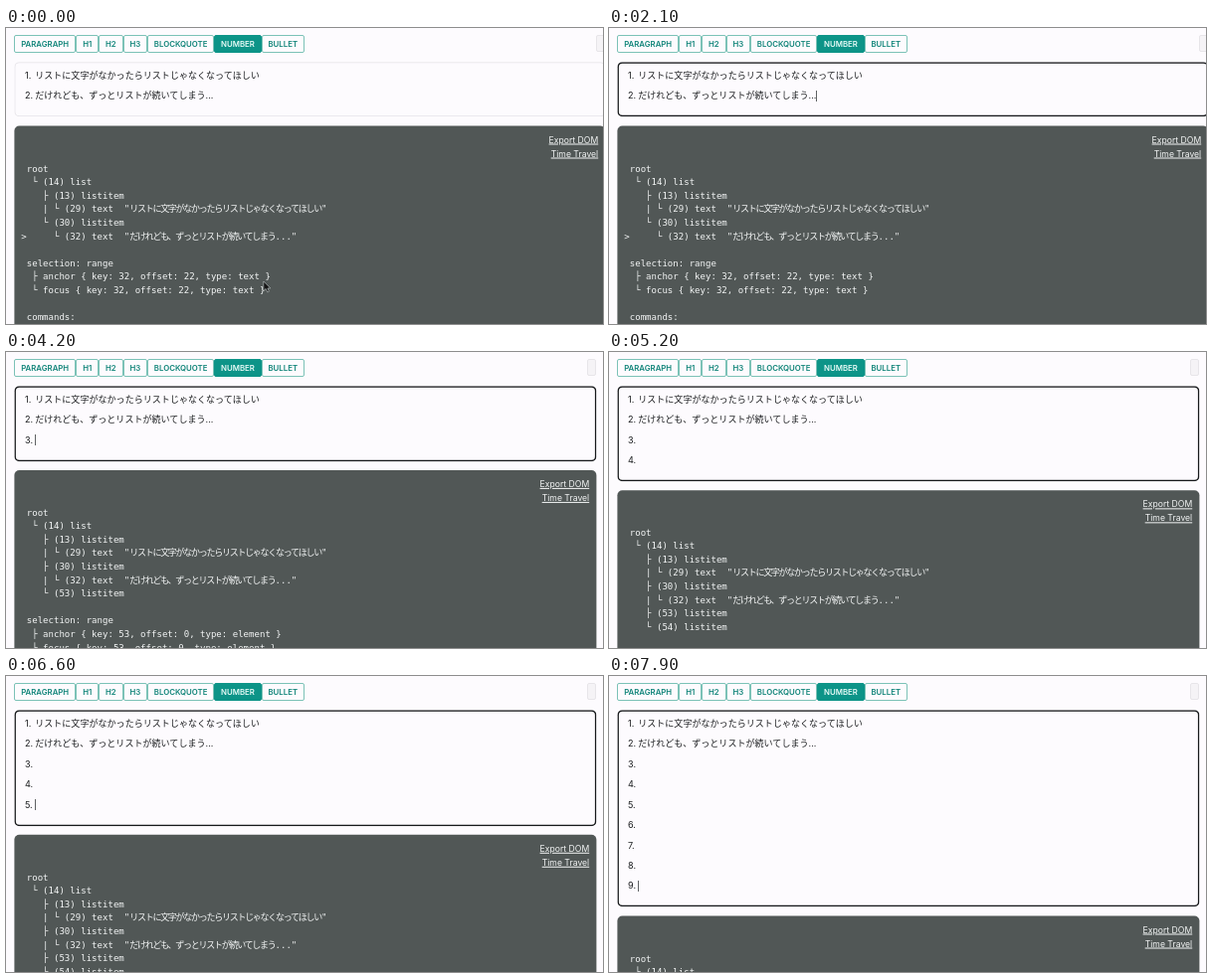
Animation of 600 by 298 pixels, one loop 8 s. Source, as an HTML page:

```html
<!DOCTYPE html>
<html lang="ja">
<head>
<meta charset="utf-8">
<title>List editor</title>
<style>
  html, body { margin: 0; width: 100%; height: 100%; overflow: hidden; background: #fdfbfe; }
  #stage { position: relative; width: 600px; height: 298px; overflow: hidden; }
  #stage * { box-sizing: border-box; }
  #stage > *, .row, .row span, .link { position: absolute; }
  #stage, .link { font-family: Inter, "Noto Sans CJK JP", sans-serif; }
  .button {
    top: 7px; height: 18px; border: 1px solid #7cc2b7; border-radius: 2px;
    color: #12857a; font-size: 7.8px; font-weight: 600; line-height: 16.5px; text-align: center;
  }
  .button.on { background: #0d9488; border-color: #0d9488; color: #e8fbf7; }
  #side { top: 7px; height: 17px; width: 9px; border: 1px solid #e7e5e9; border-radius: 2px; background: #f5f3f6; }
  #editor { left: 0; top: 0; transform: translate(8.4px, 34.2px); border-radius: 5px; box-shadow: inset 0 0 0 1px #e6e4e9; }
  #editor.focus { box-shadow: inset 0 0 0 1.5px #17191b; }
  .row { left: 0; height: 20.4px; line-height: 20.4px; font-size: 9.05px; color: #1d1f21; white-space: pre; }
  .row .num { left: 19px; }
  .row .text { left: 29.2px; }
  #caret { width: 1px; height: 11px; background: #606264; }
  #panel { left: 0; top: 0; height: 320px; border-radius: 5px; background: #515756; }
  .link { right: 6.8px; font-size: 8.65px; line-height: 13.6px; color: #f1f3f3; text-decoration: underline; white-space: pre; }
  #tree {
    left: 6.9px; top: 36.7px; margin: 0; position: absolute; color: #f4f6f6;
    font: 9.05px/13.6px "DejaVu Sans Mono", monospace;
  }
  #tree span { font-family: "Noto Sans CJK JP", sans-serif; font-weight: 500; letter-spacing: -1.32px; line-height: 0; }
  #mouse { left: 0; top: 0; width: 10px; height: 14px; overflow: visible; }
</style>
</head>
<body>
<div id="stage">
  <div id="side"></div>
  <div id="editor"></div>
  <div id="list"></div>
  <div id="caret"></div>
  <div id="panel">
    <div class="link" style="top:8.2px">Export DOM</div>
    <div class="link" style="top:21.8px">Time Travel</div>
    <pre id="tree"></pre>
  </div>
  <svg id="mouse"><path d="M0 0V9.5L2.3 7.5 4 11 5.6 10.2 4.1 7H7Z" fill="#151515" stroke="#b4baba" stroke-width=".7"/></svg>
</div>
<script>
  const LOOP = 8000, FOCUS = 900, BLINK = 1060, PITCH = 20.43;
  const ENTERS = [2700, 4400, 6300, 6800, 7200, 7500, 7800];
  const FIRST = "リストに文字がなかったらリストじゃなくなってほしい";
  const SECOND = "だけれども、ずっとリストが続いてしまう";
  const BUTTONS = [
    ["PARAGRAPH", 8, 62.4], ["H1", 70, 23.4], ["H2", 93, 24.6], ["H3", 117.5, 24.6],
    ["BLOCKQUOTE", 142, 67.3], ["NUMBER", 209, 48], ["BULLET", 256.5, 43.5]
  ];
  const $ = id => document.getElementById(id);
  const px = (el, props) => { for (const k in props) el.style[k] = props[k] + "px"; };

  function add(parent, tag, cls, text) {
    const el = parent.appendChild(document.createElement(tag));
    el.className = cls;
    el.textContent = text;
    return el;
  }

  for (const [label, left, width] of BUTTONS) {
    const cls = label === "NUMBER" ? "button on" : "button";
    px(add($("stage"), "div", cls, label), { left, width });
  }

  const rows = Array.from({ length: 9 }, (_, i) => {
    const row = add($("list"), "div", "row", "");
    px(row, { top: 38 + PITCH * i });
    add(row, "span", "num", i + 1 + ".");
    add(row, "span", "text", [FIRST, SECOND + "..."][i] || "");
    return row;
  });

  function treeText(n) {
    const two = n === 2;
    const lines = [
      " root", "  └ (14) list", "    ├ (13) listitem",
      `    | └ (29) text  "<span>${FIRST}</span>"`,
      `    ${two ? "└" : "├"} (30) listitem`,
      `${two ? ">     " : "    | "}└ (32) text  "<span>${SECOND}</span>..."`
    ];
    for (let i = 3; i <= n; i++) lines.push(`    ${i === n ? "└" : "├"} (${50 + i}) listitem`);
    const point = two ? "{ key: 32, offset: 22, type: text }"
                      : `{ key: ${50 + n}, offset: 0, type: element }`;
    lines.push("", " selection: range", "  ├ anchor " + point, "  └ focus " + point, "", " commands:");
    return lines.join("\n");
  }

  let shown = 0;
  function layout(n) {
    if (n === shown) return;
    shown = n;
    const right = n === 2 ? 602 : 593;   // the page scrollbar takes 9px
    const grow = PITCH * (n - 2);
    px($("side"), { left: right - 9 });
    px($("editor"), { width: right - 8.4, height: 55.4 + grow });
    px($("panel"), { width: right - 8.4 });
    $("panel").style.transform = `translate(8.4px, ${98.5 + grow}px)`;
    px($("caret"), { left: n === 2 ? 208 : 29.2, top: 42.5 + PITCH * (n - 1) });
    rows.forEach((row, i) => row.style.display = i < n ? "" : "none");
    $("tree").innerHTML = treeText(n);
  }

  function draw(now) {
    const t = now % LOOP;
    const typed = ENTERS.filter(e => t >= e);
    const focused = t >= FOCUS;
    layout(2 + typed.length);
    $("editor").className = focused ? "focus" : "";

    const since = t - (typed.length ? typed[typed.length - 1] : FOCUS);
    $("caret").style.visibility = focused && since % BLINK < BLINK / 2 ? "visible" : "hidden";

    const u = Math.min(1, Math.max(0, (t - 50) / 700));
    const k = u * u * (3 - 2 * u);
    $("mouse").style.transform = `translate(${258.8 - 47 * k}px, ${255 - 187 * k}px)`;
    $("mouse").style.visibility = focused ? "hidden" : "visible";
  }

  const start = performance.now();
  function tick() {
    draw(performance.now() - start);
    requestAnimationFrame(tick);
  }
  tick();
</script>
</body>
</html>
```
